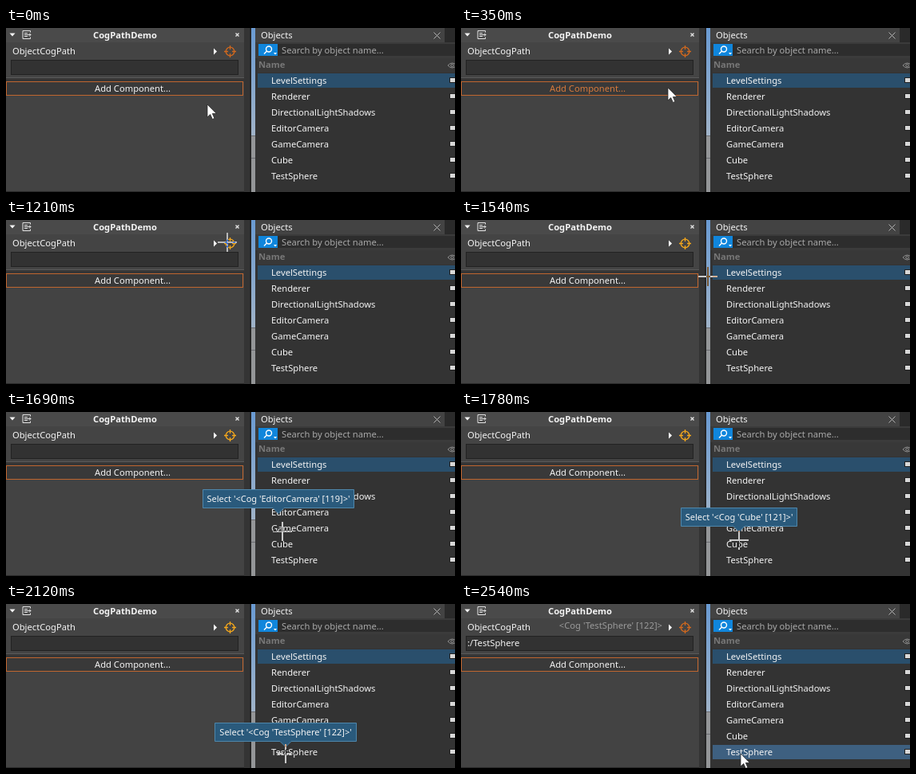
Write an HTML page that moves like this. It is 562x206 px and loops after 3300 ms.

```html
<!DOCTYPE html>
<html lang="en">
<head>
<meta charset="utf-8">
<title>Object picker</title>
<style>
  html, body { margin: 0; width: 100%; height: 100%; overflow: hidden; background: #333; }
  svg { display: block; width: 562px; height: 206px; }
  text { font: 11.2px "Noto Sans", sans-serif; fill: #f4f4f4; white-space: pre; }
  .bold { font-weight: 700; }
  .crisp { shape-rendering: crispEdges; }
  #label { font-size: 11px; }
  #cross { mix-blend-mode: difference; }
</style>
</head>
<body>
<svg viewBox="0 0 562 206">
  <defs>
    <linearGradient id="sky" x2="0" y2="1">
      <stop offset="0" stop-color="#6a9bd3"/>
      <stop offset="1" stop-color="#a0b3c8"/>
    </linearGradient>
  </defs>

  <g class="crisp">
    <rect width="562" height="206" fill="#2a2a2a"/>
    <rect width="298" height="206" fill="#434343"/>
    <rect width="298" height="18" fill="#4a4a4a"/>
    <rect y="18" width="298" height="44" fill="#444"/>
    <rect y="62" width="298" height="1" fill="#5a5a5a"/>
    <rect y="63" width="298" height="4" fill="#363636"/>
    <rect x="6.5" y="40.5" width="284" height="18" fill="#323232" stroke="#222"/>
    <rect x=".5" y="67.5" width="296" height="17" fill="#393939" stroke="#c0662f"/>
    <rect y="205" width="298" height="1" fill="#2a2a2a"/>
    <rect x="298" width="7" height="206" fill="#343434"/>
    <rect x="305" width="2" height="206" fill="#252525"/>
    <rect x="307" width="5" height="135" fill="url(#sky)"/>
    <rect x="307" y="135" width="5" height="71" fill="#949698"/>
    <path d="M307 135.500h5M307 163.500h5" stroke="#6a6c70"/>
    <rect x="312" width="250" height="206" fill="#333"/>
    <rect x="312" width="237" height="18" fill="#434343"/>
    <rect x="549" width="13" height="18" fill="#2a2a2a"/>
    <rect x="312" y="18" width="250" height="20" fill="#3b3b3b"/>
    <rect x="340" y="20" width="222" height="15" fill="#2d2d2d"/>
    <rect x="316" y="20" width="24" height="15" fill="#1086dc"/>
    <rect x="315" y="38" width="247" height="18" fill="#383838"/>
    <rect x="315" y="57" width="247" height="18" fill="#2a4f6c"/>
    <rect id="picked" x="315" y="177" width="247" height="18" fill="#3e6080"/>
  </g>

  <path d="M4.500 6.500h7l-3.500 4z" fill="#f4f4f4"/>
  <g fill="none" stroke="#e4e4e4">
    <path d="M30.500 5.500v-2h-9.500v10h9.500v-2M23 6.500h4M23 8.500h8M23 10.500h4M29 6.500l2 2l-2 2"/>
    <path d="M287.500 6.500l4 4m0-4l-4 4" stroke-width="1.300"/>
    <path d="M535.500 5.500l8 8m0-8l-8 8" stroke="#b4b4b4"/>
  </g>
  <path d="M260 25.500v8l4-4z" fill="#fff"/>
  <g id="target" fill="none" stroke-width="1.300">
    <circle cx="280.500" cy="29.500" r="5.300"/>
    <path d="M280.500 22v5m0 5v5M273 29.500h5m5 0h5"/>
  </g>
  <g fill="none" stroke="#fff" stroke-width="1.400">
    <circle cx="329" cy="26.500" r="3.500"/>
    <path d="M326.500 29l-3.500 3.500"/>
  </g>
  <path d="M335 31h4l-2 2.500z" fill="#fff"/>
  <g fill="none" stroke="#8c8c8c">
    <path d="M553 47q5.500-6 11 0q-5.500 6-11 0z"/>
    <circle cx="558.500" cy="47" r="1.700"/>
  </g>

  <text class="bold" x="149" y="13" text-anchor="middle">CogPathDemo</text>
  <text x="8" y="33">ObjectCogPath</text>
  <text id="add" x="158.500" y="80" text-anchor="middle">Add Component...</text>
  <text x="319" y="13">Objects</text>
  <text x="345" y="32" style="fill:#a9a9a9">Search by object name...</text>
  <text class="bold" x="316" y="50" style="fill:#777">Name</text>
  <g id="rows"></g>
  <g id="result">
    <text x="252" y="31" text-anchor="end" style="fill:#9a9a9a">&lt;Cog 'TestSphere' [122]&gt;</text>
    <text x="8" y="53">:/TestSphere</text>
  </g>

  <g id="tip">
    <path id="bubble" fill="#2a5a7c" stroke="#4f87ab"/>
    <text id="label" text-anchor="middle" y="-22"></text>
  </g>
  <path id="cross" class="crisp" d="M-12 0h24M0-12v24" stroke="#fff" stroke-width="2"/>
  <path id="arrow" d="M0 0v16l3.700-3.500 2.700 6 2.500-1.100-2.600-5.900h5z" fill="#fff" stroke="#222" stroke-width=".7"/>
</svg>

<script>
const LOOP = 3300, STEP = 30, LAG = 30;
const names = ['LevelSettings', 'Renderer', 'DirectionalLightShadows', 'EditorCamera',
  'GameCamera', 'Cube', 'TestSphere'];
const el = Object.fromEntries([...document.querySelectorAll('[id]')].map(e => [e.id, e]));

el.rows.innerHTML = names.map((name, i) =>
  `<text x="332" y="${70 + 20 * i}">${name}</text>
   <rect class="crisp" x="555.5" y="${62.5 + 20 * i}" width="8" height="6" fill="#d8d8d8" stroke="#222"/>`).join('');

// Pointer path: time, x, y
const path = [
  [200, 252, 96], [290, 254, 87], [410, 264, 62], [530, 275, 34], [620, 277, 28.5],
  [1210, 277, 28], [1360, 284, 35], [1500, 301, 58], [1600, 322, 90], [1630, 331, 111],
  [1660, 341, 135.5], [1690, 346, 150], [1720, 347, 156], [1750, 347.5, 158],
  [1865, 349, 171], [1900, 349, 178], [2000, 350, 186], [2110, 350, 187.6]
];

function pointer(t) {
  const next = path.findIndex(p => p[0] > t);
  if (next === 0) return path[0].slice(1);
  if (next < 0) return path[path.length - 1].slice(1);
  const [t0, x0, y0] = path[next - 1], [t1, x1, y1] = path[next];
  const k = (t - t0) / (t1 - t0);
  return [x0 + (x1 - x0) * k, y0 + (y1 - y0) * k];
}

const show = (e, on) => e.style.display = on ? '' : 'none';
const place = (e, x, y) => e.setAttribute('transform', `translate(${Math.round(x)} ${Math.round(y)})`);

// Each move advances in steps counted from its own start
function stepped(t) {
  const start = [1750, 1210, 200].find(s => t >= s);
  return start === undefined ? t : start + Math.floor((t - start) / STEP) * STEP;
}

function drawTip(t) {
  const [x, y] = pointer(t - LAG);
  const row = Math.floor((y - 56) / 20);
  const on = t > 1210 && t < 2510 && x > 316 && row >= 0;
  show(el.tip, on);
  if (!on) return;
  const text = `Select '<Cog '${names[row]}' [${116 + row}]>'`;
  if (el.label.textContent !== text) {
    el.label.textContent = text;
    const half = Math.round(el.label.getComputedTextLength() / 2 + 5) + .5;
    el.bubble.setAttribute('d', `M${-half}-37.500H${half}V-14.500H7L0-7.500L-7-14.500H${-half}z`);
  }
  place(el.tip, x, Math.floor(y));
}

function draw(now) {
  const time = now % LOOP, t = stepped(time);
  const [x, y] = pointer(t);
  const picking = time >= 850 && time < 2540;
  show(el.arrow, !picking);
  show(el.cross, picking);
  place(picking ? el.cross : el.arrow, x, y);
  el.target.setAttribute('stroke', time >= 750 && time < 2510 ? '#f5a81c' : '#d2691e');
  el.add.style.fill = time < 620 && y >= 67 && y < 85 ? '#d77a3c' : '';
  show(el.picked, time >= 2480);
  show(el.result, time >= 2510);
  drawTip(t);
}

const origin = performance.now();
function tick() {
  draw(performance.now() - origin);
  requestAnimationFrame(tick);
}
tick();
</script>
</body>
</html>
```
